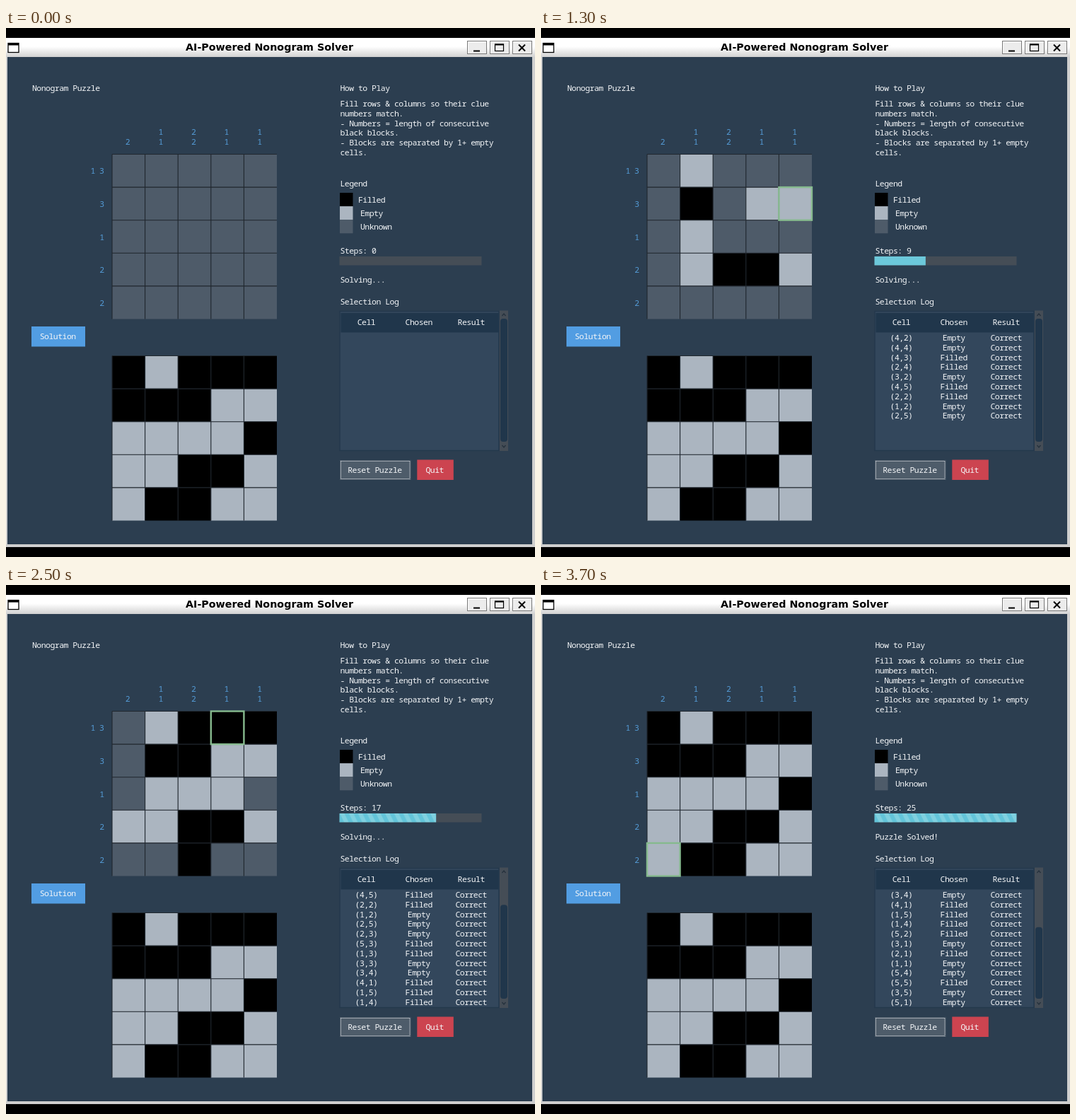
These frames come from a looping animation (748 px wide and 748 px high, 3800 ms). An HTML page:

```html
<!DOCTYPE html>
<html lang="en">
<head>
<meta charset="utf-8">
<title>Nonogram Solver</title>
<style>
html, body { margin: 0; width: 100%; height: 100%; overflow: hidden; background: #000; }
svg { display: block; width: 748px; height: 748px; }
text { font: 11.5px "Noto Sans Mono", "DejaVu Sans Mono", monospace; letter-spacing: -.53px; fill: #f4f6f8; white-space: pre; }
.clue { fill: #549bd6; }
.title { font: bold 14.29px "DejaVu Sans", sans-serif; letter-spacing: 0; fill: #000; }
</style>
</head>
<body>
<svg id="stage" viewBox="0 0 748 748">
  <defs>
    <linearGradient id="bar" x2="0" y2="1">
      <stop offset=".45" stop-color="#fff"/><stop offset="1" stop-color="#d2d2d2"/>
    </linearGradient>
    <pattern id="stripes" width="12.8" height="13" patternUnits="userSpaceOnUse" x="472" y="323">
      <path d="M0 0H12.8V13H0Z" fill="#63c4d9"/>
      <path d="M0 0H6.4L12.8 13H6.4Z" fill="#80d0df"/>
    </pattern>
  </defs>
</svg>
<script>
const LOOP = 3800, TICK = 100, ROWS = 12;
const INK = { bg: '#2c3e50', unknown: '#4e5b69', empty: '#abb5c0', filled: '#000', navy: '#20364b', trough: '#454d56' };
const SOLUTION = ['10111', '11100', '00001', '00110', '01100'];
// Each pick: row, column, logged choice
const PICKS = ('42E 44E 43F 24F 32E 45F 22F 12E 25E 23E 53F 13F 33E 34E 41F 15F 14F ' +
  '52F 31E 21F 11E 54E 55F 35E 51E').split(' ');
const CELL = 46.6, LEFT = 150, TOP = 178.5, LOWER = 463.5, LINE = 13.8;
const stage = document.getElementById('stage');

function add(tag, attrs, content) {
  const el = document.createElementNS('http://www.w3.org/2000/svg', tag);
  for (const key in attrs) el.setAttribute(key, attrs[key]);
  if (content !== undefined) el.textContent = content;
  return stage.appendChild(el);
}
const rect = (x, y, width, height, fill, more) => add('rect', { x, y, width, height, fill, ...more });
const path = (d, stroke, width = 1, more) => add('path', { d, stroke, 'stroke-width': width, fill: 'none', ...more });
const text = (x, y, s, anchor = 'start', cls = '') => add('text', { x, y, 'text-anchor': anchor, class: cls }, s);
const ink = (r, c) => SOLUTION[r][c] === '1' ? INK.filled : INK.empty;

function grid(top, color) {
  const cells = [];
  for (let r = 0; r < 5; r++) for (let c = 0; c < 5; c++)
    cells.push(rect(LEFT + c * CELL, top + r * CELL, CELL, CELL, color(r, c)));
  for (let i = 0; i < 5; i++) {
    const x = LEFT + i * CELL, y = top + i * CELL;
    path(`M${x} ${top}v${5 * CELL}M${LEFT} ${y}h${5 * CELL}`, '#20272e', 1.1);
  }
  return cells;
}

function frameWindow() {
  rect(0, 14, 748, 720, '#cfcfcf');
  rect(0, 14, 748, 27, 'url(#bar)');
  rect(2, 41, 742, 689, INK.bg);
  rect(3, 21.5, 15, 13, '#fff', { stroke: '#000', 'stroke-width': 1.3 });
  rect(3, 21, 15, 3.5, '#000');
  text(372.5, 32, 'AI-Powered Nonogram Solver', 'middle', 'title');
  for (const x of [652, 684, 716]) {
    rect(x + .5, 18.5, 27, 18, '#ececec', { stroke: '#777' });
    path(`M${x + 1.5} 36V19.5H${x + 27}`, '#fff');
  }
  path('M661 32.5h9', '#000', 2);
  rect(691.5, 23, 12, 9.5, 'none', { stroke: '#000', 'stroke-width': 1.2 });
  path('M691 23.5h13', '#000', 2);
  path('M725 23.5l9 9m0 -9l-9 9', '#000', 2);
}

function button(x, y, w, h, fill, label) {
  rect(x, y, w, h, fill);
  text(x + w / 2 - .8, y + h / 2 + 4, label, 'middle');
}

frameWindow();
text(37, 89, 'Nonogram Puzzle');
[' 2', '11', '22', '11', '11'].forEach((pair, c) => {
  [...pair].forEach((n, i) => text(172 + c * CELL, 151 + i * LINE, n, 'middle', 'clue'));
});
['1 3', '3', '1', '2', '2'].forEach((s, r) => text(138.5, 206.3 + r * CELL, s, 'end', 'clue'));
const cells = grid(TOP, () => INK.unknown);
const glow = rect(0, 0, CELL, CELL, 'none', { stroke: '#86ba8e', 'stroke-width': 2.4 });
grid(LOWER, ink);
button(36, 422, 76, 28.5, '#529de2', 'Solution');

text(472.5, 89, 'How to Play');
['Fill rows & columns so their clue', 'numbers match.', '- Numbers = length of consecutive',
  'black blocks.', '- Blocks are separated by 1+ empty', 'cells.']
  .forEach((s, i) => text(472.5, 111 + i * LINE, s));
text(472.5, 224, 'Legend');
[['Filled', INK.filled, 498], ['Empty', INK.empty, 501], ['Unknown', INK.unknown, 501]].forEach(([s, fill, x], i) => {
  rect(472, 233 + i * 19.1, 18.5, 19.1, fill);
  text(x, 246.7 + i * 19.1, s);
});
const count = text(472.5, 319, '');
rect(471.5, 323, 201, 12.5, INK.trough);
const meter = rect(471.5, 323, 0, 12.5, '#6cc8da');
const status = text(472.5, 360, '');
text(472.5, 391, 'Selection Log');

rect(472, 400.5, 225, 197, '#33475c', { stroke: '#24384c', 'stroke-width': 1.5 });
rect(473.5, 403, 223, 27.5, INK.navy);
const COLS = [509.5, 583.7, 657.7];
['Cell', 'Chosen', 'Result'].forEach((s, i) => text(COLS[i], 420.3, s, 'middle'));
const log = Array.from({ length: ROWS }, (_, i) => COLS.map(x => text(x, 442 + i * LINE, '', 'middle')));
rect(698, 399.5, 12, 198.5, INK.trough);
const thumb = rect(699, 411, 10, 174, INK.navy, { rx: 4 });
path('M701.5 407l2.5 -3l2.5 3M701.5 590l2.5 3l2.5 -3', '#25313d', 1.3);

button(472, 611, 100.5, 28, '#4e5c6a', 'Reset Puzzle');
rect(473.5, 612.5, 97.5, 25, 'none', { stroke: '#e6e9ec', 'stroke-dasharray': '1 1' });
button(581.3, 610.5, 51.5, 28.5, '#cc4450', 'Quit');

function draw(t) {
  const pace = Math.floor(t / TICK) * .68 + .75;
  const step = Math.min(PICKS.length, Math.floor(pace));
  const done = step === PICKS.length;

  cells.forEach(cell => cell.setAttribute('fill', INK.unknown));
  PICKS.slice(0, step).forEach(([row, col]) => {
    const r = row - 1, c = col - 1;
    cells[r * 5 + c].setAttribute('fill', ink(r, c));
    glow.setAttribute('x', LEFT + c * CELL);
    glow.setAttribute('y', TOP + r * CELL);
  });
  glow.setAttribute('visibility', step && (done || pace % 1 < .8) ? 'visible' : 'hidden');

  count.textContent = 'Steps: ' + step;
  status.textContent = done ? 'Puzzle Solved!' : 'Solving...';
  meter.setAttribute('width', step * 8.04);
  meter.setAttribute('fill', step > 13 ? 'url(#stripes)' : '#6cc8da');

  const first = Math.max(0, step - ROWS);
  log.forEach((line, i) => {
    const pick = first + i < step ? PICKS[first + i] : '';
    const values = pick ? [`(${pick[0]},${pick[1]})`, pick[2] === 'F' ? 'Filled' : 'Empty', 'Correct'] : ['', '', ''];
    line.forEach((el, j) => { el.textContent = values[j]; });
  });
  const size = 34 + 140 * Math.min(1, ROWS / Math.max(step, 1));
  thumb.setAttribute('y', 585 - size);
  thumb.setAttribute('height', size);
}

const start = performance.now();
function tick() {
  draw((performance.now() - start) % LOOP);
  requestAnimationFrame(tick);
}
draw(0);
requestAnimationFrame(tick);
</script>
</body>
</html>
```
